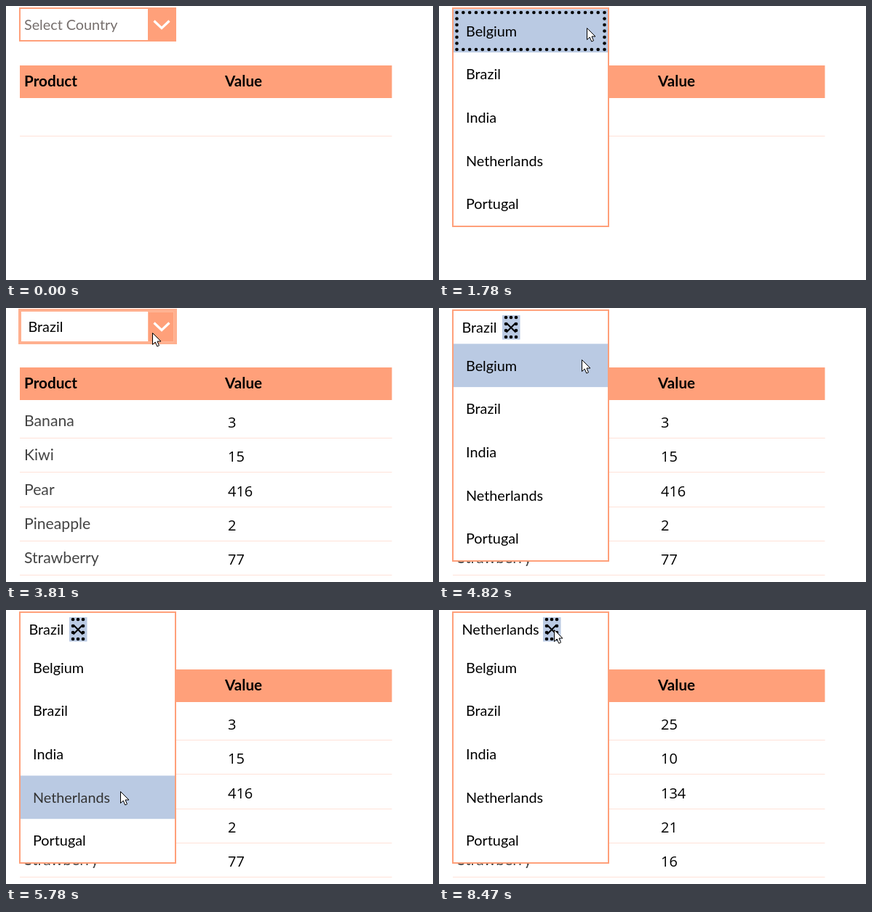
An HTML page for the animation above (8540 ms loop, 587 by 378 pixels).

```html
<!DOCTYPE html>
<html lang="en">
<head>
<meta charset="utf-8">
<title>Country picker</title>
<style>
html, body { margin: 0; width: 100%; height: 100%; overflow: hidden; background: #fff; }
svg { display: block; width: 587px; height: 378px; font: 19.8px Lato, sans-serif; }
.head { font-size: 20.7px; font-weight: 700; }
.product { font-size: 21.2px; fill: #444; }
.value { font: 20px "Open Sans", sans-serif; }
</style>
</head>
<body>
<svg id="stage" viewBox="0 0 587 378"></svg>
<script>
const LOOP = 8540, FRAME = 68, CLICK = 130;
const CORAL = '#ffa07a', PALE = '#ffb08f', BLUE = '#bacae3', LINE = '#ffe2d8';
const ROW = 59.7, CELL = 47.35, HEADER = 45;
const countries = ['Belgium', 'Brazil', 'India', 'Netherlands', 'Portugal'];
const products = ['Banana', 'Kiwi', 'Pear', 'Pineapple', 'Strawberry'];
const values = { Brazil: [3, 15, 416, 2, 77], Netherlands: [25, 10, 134, 21, 16] };
const clearX = { Brazil: 87, Netherlands: 143 };

// Each use of the picker: pointer over it, list opens, a row is pressed.
const uses = [
  { hover: 1310, open: 1310, press: 2470, pick: 'Brazil' },
  { hover: 3480, open: 4480, press: 5710, pick: 'Netherlands' },
  { hover: 7260, open: 7400, press: LOOP }
];

// The pointer goes from stop to stop along quadratic curves.
const entry = [238, -14];
const moves = [
  { start: 840, end: 1380, via: [228, 16], to: [222, 21] },
  { start: 1660, end: 2200, via: [176, 39], to: [161, 78] },
  { start: 3070, end: 3810, via: [180, 60], to: [205, 29] },
  { start: 4820, end: 5510, via: [155, 274], to: [157, 250] },
  { start: 6370, end: 7190, via: [215, 71], to: [217, 39] },
  { start: 7800, end: 8130, via: [180, 28], to: [153, 30] },
  { start: 8400, end: 8470, via: [156, 28], to: [158, 27] }
];

const stage = document.getElementById('stage');

function el(parent, tag, attrs, text) {
  const node = document.createElementNS('http://www.w3.org/2000/svg', tag);
  for (const key in attrs) node.setAttribute(key, attrs[key]);
  if (text !== undefined) node.textContent = text;
  parent.append(node);
  return node;
}
const group = (parent = stage) => el(parent, 'g', {});
const box = (parent, x, y, width, height, fill, more) =>
  el(parent, 'rect', { x, y, width, height, fill, ...more });
const label = (parent, x, y, text, cls = '') => el(parent, 'text', { x, y, class: cls }, text);
const set = (node, key, value) => node.setAttribute(key, value);
const show = (node, on) => { node.style.display = on ? '' : 'none'; };

// Dots along the edges of a box, with nx and ny gaps per side.
function dotFrame(parent, x, y, width, height, nx, ny) {
  for (let i = 0; i <= nx; i++)
    for (let j = 0; j <= ny; j++)
      if (i % nx === 0 || j % ny === 0)
        el(parent, 'circle', { cx: x + width * i / nx, cy: y + height * j / ny, r: 2.3 });
}

// Table
box(stage, 19, 82, 511.5, 45, CORAL);
label(stage, 25, 111, 'Product', 'head');
label(stage, 301, 111, 'Value', 'head');
box(stage, 19, 179, 511.5, 1, LINE);
const table = group();
const cells = products.map((name, i) => {
  const y = i * CELL;
  label(table, 25, 163 + y, name, 'product');
  box(table, 19, Math.round(179 + y), 511.5, 1, LINE);
  return label(table, 305, 165 + y, '', 'value');
});

// Closed box
const closed = group();
box(closed, 19, 3, 214, 45, '#fff');
box(closed, 195, 4, 38, 44, CORAL);
const ring = box(closed, 19, 3, 214, 45, 'none');
const seam = box(closed, 195.5, 5.5, 35, 41, 'none', { stroke: '#ffb899' });
el(closed, 'path', { d: 'M203.5 20.5L214 30.5L224.5 20.5', fill: 'none', stroke: '#fff', 'stroke-width': 3.2 });
const caption = label(closed, 25, 33, '');

// Open list
const list = group();
const sheet = box(list, 19, 3, 214, 301, '#fff', { stroke: CORAL, 'stroke-width': 2 });
const rows = group(list);
const focus = group(rows);
box(focus, 20, 4.4, 212, ROW, BLUE);
const dots = group(focus);
dotFrame(dots, 24.5, 9, 203, 51, 23, 6);
const names = countries.map((name, i) => label(rows, 37, Math.floor(42 + i * ROW), name));

const chosen = group(list);
const chosenName = label(chosen, 31.5, 34, '');
const clear = group(chosen);
box(clear, 0, 10, 24.5, 33.5, BLUE);
el(clear, 'path', { d: 'M5.5 20.5L18.5 33.5M18.5 20.5L5.5 33.5', stroke: '#000', 'stroke-width': 2 });
dotFrame(clear, 5, 13, 14, 27, 2, 3);

const pointer = el(stage, 'path', {
  d: 'M.5 .5V16.5L4.2 13L6.8 19L9.5 17.8L7 12H12Z', fill: '#fff', stroke: '#000'
});

function pointerAt(t) {
  const i = moves.findLastIndex(m => t >= m.start);
  if (i < 0) return null;
  const { start, end, via, to } = moves[i];
  const from = i ? moves[i - 1].to : entry;
  const step = Math.floor((t - start) / FRAME + .1) + 1;
  const u = Math.min(1, step * FRAME / (end - start + FRAME)), v = 1 - u;
  return to.map((p, k) => Math.round(v * v * from[k] + 2 * u * v * via[k] + u * u * p));
}

function drawClosed(pick, hover) {
  caption.textContent = pick || 'Select Country';
  set(caption, 'x', pick ? 30.5 : 25);
  set(caption, 'fill', pick ? '#000' : '#766f6d');
  set(ring, 'stroke', hover ? PALE : CORAL);
  set(ring, 'stroke-width', pick ? 4 : 2);
  show(seam, pick);
}

function drawList(pick, press, y) {
  const shift = pick ? HEADER : 0;
  const over = Math.floor((y - 4.4 - shift) / ROW);
  set(sheet, 'height', 301 + shift);
  set(rows, 'transform', `translate(0 ${shift})`);
  set(focus, 'transform', `translate(0 ${over * ROW})`);
  show(focus, over >= 0);
  show(dots, !pick);
  names.forEach((node, i) => set(node, 'fill', press && i === over ? '#333' : '#000'));
  show(chosen, pick);
  if (!pick) return;
  chosenName.textContent = pick;
  set(clear, 'transform', `translate(${clearX[pick]} 0)`);
}

function draw(t) {
  const at = pointerAt(t);
  show(pointer, at);
  if (at) set(pointer, 'transform', `translate(${at})`);

  const now = uses.findIndex(use => t < use.press + CLICK);
  const use = uses[now], pick = now ? uses[now - 1].pick : '';
  const open = t >= use.open;
  show(table, pick);
  if (pick) cells.forEach((cell, i) => { cell.textContent = values[pick][i]; });
  show(closed, !open);
  show(list, open);
  if (open) drawList(pick, t >= use.press, at[1]);
  else drawClosed(pick, t >= use.hover);
}

const begin = performance.now();
function tick() {
  draw((performance.now() - begin) % LOOP);
  requestAnimationFrame(tick);
}
tick();
</script>
</body>
</html>
```
